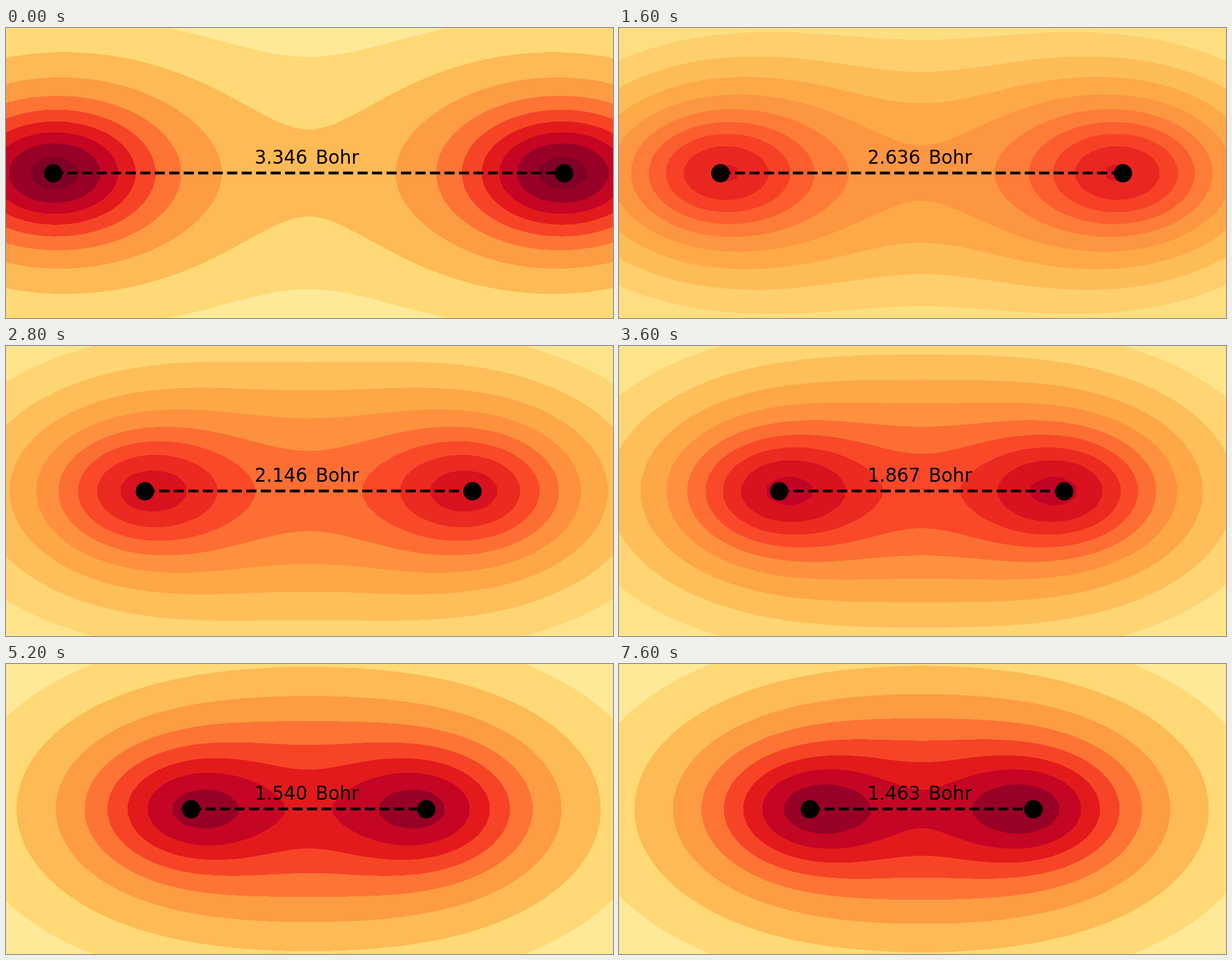
An HTML page with a canvas that plays this animation: 1083x517 px, repeating every 8 s.

```html
<!DOCTYPE html>
<html lang="en">
<head>
<meta charset="utf-8">
<title>Bond length</title>
<style>
  html, body { margin: 0; width: 100%; height: 100%; overflow: hidden; }
  canvas, svg { position: absolute; left: 0; top: 0; width: 1083px; height: 517px; display: block; }
  text { font: 33px "DejaVu Sans", sans-serif; }
</style>
</head>
<body>
<canvas id="field" width="1083" height="517"></canvas>
<svg viewBox="0 0 1083 517">
  <line id="bond" y1="258.5" y2="258.5" stroke="#000" stroke-width="4.88" stroke-dasharray="18.05 7.8"/>
  <circle id="left" cy="259" r="16.4"/>
  <circle id="right" cy="259" r="16.4"/>
  <text id="length" x="443.4" y="241.5"></text>
  <text x="552.4" y="241.8">Bohr</text>
</svg>
<script>
const W = 1083, H = 517, CX = 540.1, CY = 258.6;
const SX = 272.4, SY = 177;      // pixels per Bohr
const DX = 18.46, DY = 18.4;     // sampling grid
const COLS = 62, ROWS = 32;
const HOLD = 400, COUNT = 20, VMAX = 0.4;

// Key bond lengths: [step, Bohr], joined by a smooth curve
const keys = [[0, 3.346], [2, 2.961], [4, 2.636], [7, 2.146], [11, 1.647], [15, 1.492], [19, 1.463]];

// Orbital shapes: three Gaussian amplitudes, three exponents
const initial = [0.181, 0.1751, 0.0546, 3.425, 0.624, 0.169];
const loose = [0.0735, 0.135, 0.0765, 4.6, 0.8, 0.17];
const middle = [0.08, 0.102, 0.079, 3.43, 0.69, 0.181];
const tight = [0.122, 0.113, 0.0825, 3.6, 0.78, 0.23];

const ramp = [0xffffcc, 0xffeda0, 0xfed976, 0xfeb24c, 0xfd8d3c, 0xfc4e2a, 0xe31a1c, 0xbd0026, 0x800026]
  .map(c => [c >> 16, c >> 8 & 255, c & 255]);

const byId = id => document.getElementById(id);
const mix = (a, b, t) => a + (b - a) * t;
const mixAll = (a, b, t) => a.map((v, i) => mix(v, b[i], t));
const clamp = t => Math.max(0, Math.min(1, t));

const ctx = byId("field").getContext("2d");
const image = ctx.createImageData(W, H);
const pixels = new Uint32Array(image.data.buffer);
const nodes = new Float64Array(COLS * ROWS);
const nodeX = i => (i - COLS / 2 + 0.5) * DX;
const nodeY = j => (j - ROWS / 2 + 0.5) * DY;

function slope(i) {
  const a = keys[Math.max(i - 1, 0)], b = keys[Math.min(i + 1, keys.length - 1)];
  return (b[1] - a[1]) / (b[0] - a[0]);
}

// Cubic Hermite curve through the key lengths
function bondAt(step) {
  const i = Math.max(0, keys.findIndex(k => k[0] >= step) - 1);
  const [s0, b0] = keys[i], [s1, b1] = keys[i + 1];
  const span = s1 - s0, t = (step - s0) / span, u = 1 - t;
  return b0 * u * u * (1 + 2 * t) + b1 * t * t * (1 + 2 * u)
    + span * t * u * (slope(i) * u - slope(i + 1) * t);
}

// The shape relaxes at once, then tightens along a Bezier path as the bond shrinks
function shapeAt(step, bond) {
  const w = clamp((2.8 - bond) / (2.8 - 1.463));
  const path = mixAll(mixAll(loose, middle, w), mixAll(middle, tight, w), w);
  return mixAll(initial, path, clamp(step / 2));
}

// Packed little-endian RGBA
function rampColor(u) {
  const p = clamp(u) * 8, i = Math.min(Math.floor(p), 7);
  const [r, g, b] = mixAll(ramp[i], ramp[i + 1], p - i).map(Math.round);
  return (255 << 24 | b << 16 | g << 8 | r) >>> 0;
}

function drawField(step, bond) {
  const [a1, a2, a3, e1, e2, e3] = shapeAt(step, bond);
  const orbital = q => a1 * Math.exp(-e1 * q) + a2 * Math.exp(-e2 * q) + a3 * Math.exp(-e3 * q);
  const peak = orbital(0) + orbital(bond * bond);
  const gap = peak < 0.312 ? 0.025 : peak < 0.366 ? 0.03 : 0.04;

  for (let j = 0; j < ROWS; j++) {
    const y = nodeY(j) / SY;
    for (let i = 0; i < COLS; i++) {
      const x = nodeX(i) / SX;
      nodes[j * COLS + i] =
        (orbital((x + bond / 2) ** 2 + y * y) + orbital((x - bond / 2) ** 2 + y * y)) / gap;
    }
  }

  const bands = Array.from({ length: 20 }, (_, k) => rampColor((k + 0.5) * gap / VMAX));
  const row = new Float64Array(COLS);
  for (let py = 0; py < H; py++) {
    const v = (py + 0.5 - CY - nodeY(0)) / DY, j = Math.floor(v);
    for (let i = 0; i < COLS; i++) {
      row[i] = mix(nodes[j * COLS + i], nodes[(j + 1) * COLS + i], v - j);
    }
    for (let px = 0; px < W; px++) {
      const u = (px + 0.5 - CX - nodeX(0)) / DX, i = Math.floor(u);
      pixels[py * W + px] = bands[Math.floor(mix(row[i], row[i + 1], u - i))];
    }
  }
  ctx.putImageData(image, 0, 0);
}

function drawBond(bond) {
  const x1 = CX - bond * SX / 2, x2 = CX + bond * SX / 2;
  byId("bond").setAttribute("x1", x1);
  byId("bond").setAttribute("x2", x2);
  byId("left").setAttribute("cx", x1);
  byId("right").setAttribute("cx", x2);
  byId("length").textContent = bond.toFixed(3);
}

let shown = -1;
const start = performance.now();

function tick() {
  const step = Math.floor((performance.now() - start) / HOLD) % COUNT;
  if (step !== shown) {
    shown = step;
    const bond = bondAt(step);
    drawField(step, bond);
    drawBond(bond);
  }
  requestAnimationFrame(tick);
}
tick();
</script>
</body>
</html>
```
